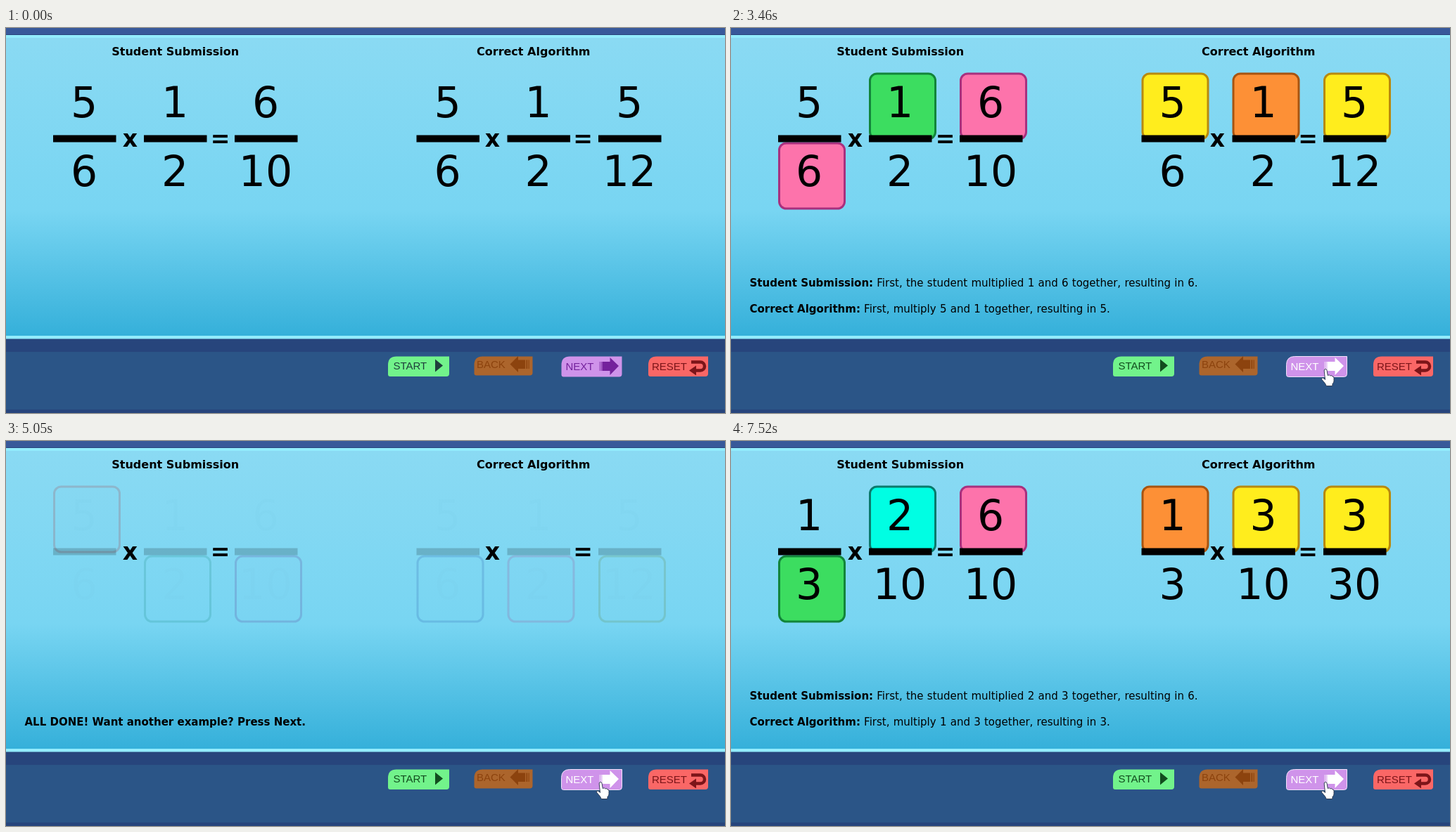
An HTML page that plays this animation: 1022 px wide and 548 px high, repeating every 8 s.

```html
<!DOCTYPE html>
<html lang="en">
<head>
<meta charset="utf-8">
<title>Fraction multiplication</title>
<style>
html, body { margin: 0; width: 100%; height: 100%; overflow: hidden; }
svg { display: block; width: 100%; height: 100%; }
text { font-family: "DejaVu Sans", Verdana, sans-serif; white-space: pre; }
.bold { font-weight: bold; }
.big { font-size: 60px; text-anchor: middle; }
.sign { font-size: 33px; font-weight: bold; text-anchor: middle; }
.note { font-size: 15px; }
.plain { word-spacing: .5px; }
.label { font: 15px "Liberation Sans", Arial, sans-serif; }
</style>
</head>
<body>
<svg id="stage" viewBox="0 0 1022 548">
  <defs>
    <linearGradient id="sky" x1="0" y1="0" x2="0" y2="1">
      <stop offset="0" stop-color="#8adaf3"/>
      <stop offset=".58" stop-color="#78d5f2"/>
      <stop offset="1" stop-color="#35b0da"/>
    </linearGradient>
  </defs>
  <rect width="1022" height="548" fill="#27457c"/>
  <rect width="1022" height="9" fill="#38599a"/>
  <rect y="10" width="1022" height="432.500" fill="#93ecfd"/>
  <rect y="14" width="1022" height="424" fill="url(#sky)"/>
  <rect y="461" width="1022" height="82" fill="#2b5587"/>
  <g class="bold" font-size="16">
    <text x="150.300" y="39">Student Submission</text>
    <text x="669" y="39">Correct Algorithm</text>
  </g>
  <g id="boxes"></g>
  <g id="bars"></g>
  <g id="signs"></g>
  <g id="digits"></g>
  <g id="notes"></g>
  <g id="start">
    <path class="face" fill="#72f38b"/>
    <g fill="currentColor">
      <text class="label" x="550.500" y="486">START</text>
      <path d="M610 471.500L621 480.500L610 489.500Z"/>
    </g>
  </g>
  <g id="back" color="#8c430e">
    <path class="face" fill="#ac652c"/>
    <g fill="currentColor">
      <text class="label" x="669" y="484">BACK</text>
      <path d="M716.500 478.500L728 467V472.500H738V485H728V490Z"/>
      <path opacity=".75" d="M739 472.500h2.500V485H739ZM742.500 472.500h1.500V485h-1.500Z"/>
    </g>
  </g>
  <g id="next">
    <path class="face" fill="#cf93ea"/>
    <g fill="currentColor">
      <text class="label" x="795.500" y="486.500">NEXT</text>
      <path d="M871 481L858.500 469V475H848V488H858.500V494Z"/>
      <path opacity=".6" d="M845.500 475h2.500V488h-2.500ZM843.500 475h1.200V488h-1.200Z"/>
    </g>
  </g>
  <g id="reset" color="#7c1519">
    <path class="face" fill="#fa6766"/>
    <text class="label" x="918" y="486.500" fill="currentColor">RESET</text>
    <path d="M974 475.500H987a6 6 0 0 1 0 12H979" fill="none" stroke="currentColor" stroke-width="4.500"/>
    <path d="M971 487.500L981 480.500V494.500Z" fill="currentColor"/>
  </g>
  <path id="hand" fill="#fff" stroke="#26334a" stroke-width=".9" stroke-linejoin="round"
    d="M-2.300 2.500Q-2.600 0-.5 0Q1.300 0 1.600 2L2.700 9Q5 7.300 6.200 9.500Q8.500 8 9.300 10.500Q11.700 9.800 11.500 13V17Q11.300 19.500 9.500 21L9.300 24H.8Q-.5 20.500-3 18L-6 14.500Q-6.800 12.500-4.500 12.500Q-3 12.800-1 15Z"/>
</svg>
<script>
const LOOP = 8000;
const $ = id => document.getElementById(id);
const cols = [67, 196, 325, 583.5, 712.5, 842];

// fill and border
const paint = {
  green: ['#3cdd60', '#12853a'], pink: ['#fd73ab', '#a8307e'],
  yellow: ['#ffed1d', '#b8890f'], orange: ['#fd9036', '#a85410'],
  red: ['#f86c6c', '#ab1414'], aqua: ['#00fee3', '#0b7a6c'],
  purple: ['#b962e1', '#551a80'], blue: ['#6197ff', '#1c449c'],
  lime: ['#b2f473', '#57751c']
};

// one word per column; a leading "-" puts the box below the bar
const boxSets = [
  '-pink green pink yellow orange yellow',
  'red -aqua -purple -blue -pink -lime',
  '-green aqua pink orange yellow yellow'
];
const digitSets = ['5/6 1/2 6/10 5/6 1/2 5/12', '1/3 2/10 6/10 1/3 3/10 3/30'];

const line = (y, head, rest = '') =>
  `<text class="note" x="26.500" y="${y}"><tspan class="bold">${head} </tspan><tspan class="plain">${rest}</tspan></text>`;
const step = (order, a, b, ab, c, d, cd) =>
  line(368, 'Student Submission:', `${order}, the student multiplied ${a} and ${b} together, resulting in ${ab}.`) +
  line(404.5, 'Correct Algorithm:', `${order}, multiply ${c} and ${d} together, resulting in ${cd}.`);

const notes = [
  [0, ''],
  [2140, step('First', 1, 6, 6, 5, 1, 5)],
  [3560, step('Second', 5, 2, 10, 6, 2, 12)],
  [4770, line(404.5, 'ALL DONE! Want another example? Press Next.')],
  [5840, ''],
  [7040, step('First', 2, 3, 6, 1, 3, 3)]
];
const presses = [[1990, 2140], [3310, 3460], [4630, 4770], [5570, 5730], [6890, 7040]];
const path = [
  [200, 736, 540], [430, 665, 505], [670, 600, 480], [1000, 600, 480],
  [1200, 720, 504], [1380, 825.5, 498], [1680, 844, 486], [1990, 845.5, 485.5]
];

const boxMarkup = set => '<g>' + set.split(' ').map((word, i) => {
  const low = word[0] === '-';
  const [fill, edge] = paint[word.replace('-', '')];
  return `<rect x="${cols[i] + 1.5}" y="${low ? 164 : 65}" width="93" height="93" rx="10"
    fill="${fill}" stroke="${edge}" stroke-width="3"/>`;
}).join('') + '</g>';

const digitMarkup = set => '<g>' + set.split(' ').map((pair, i) => {
  const [top, low] = pair.split('/');
  const x = cols[i] + 44;
  return `<text class="big" x="${x}" y="126.500">${top}</text><text class="big" x="${x}" y="225">${low}</text>`;
}).join('') + '</g>';

$('boxes').innerHTML = boxSets.map(boxMarkup).join('');
$('digits').innerHTML = digitSets.map(digitMarkup).join('');
$('bars').innerHTML = cols.map(x => `<rect x="${x}" y="152.500" width="89.500" height="10"/>`).join('');
$('signs').innerHTML = [[176.5, 'x'], [304.5, '='], [691.5, 'x'], [820, '=']]
  .map(([x, s]) => `<text class="sign" x="${x}" y="168.500">${s}</text>`).join('');

const face = (id, x, y, w, h) => $(id).querySelector('.face').setAttribute('d',
  `M${x + 12} ${y}H${x + w}V${y + h - 4}q0 4-4 4H${x + 3}q-3 0-3-3V${y + 12}q0-12 12-12Z`);
face('start', 543, 467.5, 87, 28.5);
face('back', 665.5, 467.5, 83, 27);
face('next', 789.5, 467.5, 86, 29);
face('reset', 913, 467.5, 85, 28.5);

const ease = (t, a, b) => {
  const p = Math.min(1, Math.max(0, (t - a) / (b - a)));
  return .5 - Math.cos(Math.PI * p) / 2;
};
const within = (t, a, b) => t >= a && t < b;

function handAt(t) {
  const i = path.findIndex(p => p[0] > t);
  if (i < 0) return path[path.length - 1].slice(1);
  if (i === 0) return null;
  const [t0, x0, y0] = path[i - 1], [t1, x1, y1] = path[i];
  const p = (t - t0) / (t1 - t0);
  return [x0 + (x1 - x0) * p, y0 + (y1 - y0) * p];
}

function showButton(id, color, fill, edge) {
  $(id).style.color = color;
  const f = $(id).querySelector('.face');
  f.setAttribute('fill', fill);
  f.setAttribute('stroke', edge);
}

let shownNote = -1;
function draw(t) {
  const done = ease(t, 4760, 5160);
  const again = ease(t, 6170, 6540);
  const swap = ease(t, 3530, 4120);
  const shown = [
    ease(t, 2140, 2780) * (1 - swap),
    swap * (1 - done),
    ease(t, 7040, 7520)
  ];
  const leaving = [t > 3530, t > 4760, false];
  [...$('boxes').children].forEach((g, i) => {
    g.setAttribute('stroke-opacity', shown[i]);
    g.setAttribute('fill-opacity', leaving[i] ? shown[i] ** 3 : shown[i]);
  });
  const [first, second] = $('digits').children;
  first.setAttribute('opacity', (1 - done) ** 3);
  second.setAttribute('opacity', again);
  $('bars').setAttribute('opacity', 1 - done + again);

  const n = notes.filter(([at]) => at <= t).length - 1;
  if (n !== shownNote) $('notes').innerHTML = notes[shownNote = n][1];

  const overStart = within(t, 600, 1070);
  showButton('start', overStart ? '#fff' : t < 600 ? '#1f3f3c' : '#124d1e',
    within(t, 860, 1000) ? '#63dc7b' : '#72f38b', overStart ? '#fff' : 'none');
  const overNext = t >= 1310;
  const pressed = presses.some(([a, b]) => within(t, a, b));
  showButton('next', overNext ? '#fff' : '#74229c',
    pressed ? '#c183dd' : '#cf93ea', overNext ? '#f3e2fb' : 'none');

  const at = handAt(t);
  $('hand').setAttribute('visibility', at ? 'visible' : 'hidden');
  if (at) $('hand').setAttribute('transform', `translate(${at})`);
}

const begin = performance.now();
function tick() {
  draw((performance.now() - begin) % LOOP);
  requestAnimationFrame(tick);
}
tick();
</script>
</body>
</html>
```
